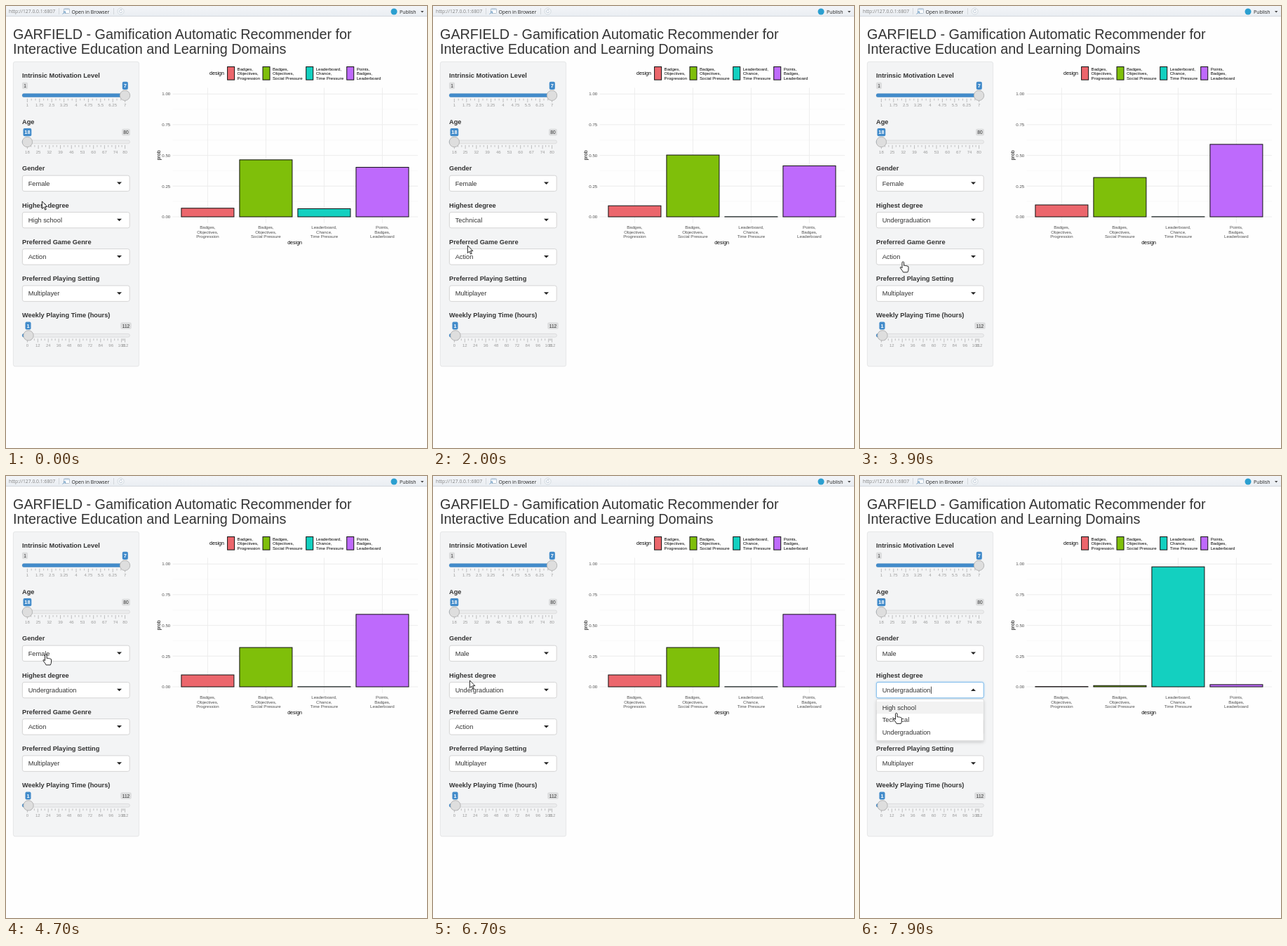
Recreate the animation shown at these times as an HTML page. Size 600 by 629 pixels, loop 8000 ms.

```html
<!DOCTYPE html>
<html lang="en">
<head>
<meta charset="utf-8">
<title>Recommender dashboard</title>
<style>
  html, body { margin: 0; width: 100%; height: 100%; overflow: hidden; background: #fefefe; }
  svg { display: block; width: 100%; height: 100%; }
  text { font-family: "Liberation Sans", Arial, sans-serif; white-space: pre; }
  .bar { font-family: "Open Sans", "Noto Sans", sans-serif; }
</style>
</head>
<body>
<svg id="stage" viewBox="0 0 600 629">
  <defs>
    <linearGradient id="chrome" x1="0" y1="0" x2="0" y2="1">
      <stop offset="0" stop-color="#f3f5f8"/><stop offset="1" stop-color="#e9edf2"/>
    </linearGradient>
    <filter id="shadow" x="-10%" y="-10%" width="120%" height="130%">
      <feDropShadow dx="0" dy="2" stdDeviation="2" flood-opacity=".18"/>
    </filter>
    <filter id="glow" x="-10%" y="-40%" width="120%" height="180%">
      <feDropShadow dx="0" dy="0" stdDeviation="1.6" flood-color="#66afe9" flood-opacity=".6"/>
    </filter>
  </defs>
</svg>
<script>
const NS = 'http://www.w3.org/2000/svg';
const stage = document.getElementById('stage');
const LOOP = 8000;

function add(tag, attrs, parent = stage) {
  const node = document.createElementNS(NS, tag);
  set(node, attrs);
  return parent.appendChild(node);
}
function set(node, attrs) {
  for (const key in attrs) node.setAttribute(key, attrs[key]);
}
function rect(x, y, width, height, fill, extra = {}, parent = stage) {
  return add('rect', { x, y, width, height, fill, ...extra }, parent);
}
function line(x1, y1, x2, y2, stroke, width = 1) {
  return add('line', { x1, y1, x2, y2, stroke, 'stroke-width': width });
}
function path(d, extra, parent = stage) {
  return add('path', { d, ...extra }, parent);
}
function text(x, y, content, size, fill = '#333', extra = {}, parent = stage) {
  const node = add('text', { x, y, 'font-size': size, fill, ...extra }, parent);
  node.textContent = content;
  return node;
}
const MIDDLE = { 'text-anchor': 'middle' };
const BOLD = { 'font-weight': 700 };

// Viewer toolbar
rect(0, 0, 600, 15, 'url(#chrome)');
line(0, 14.5, 600, 14.5, '#d3d8dd');
text(4, 10, 'http://127.0.0.1:6807', 6.8, '#808080', { class: 'bar' });
line(75.5, 3, 75.5, 12, '#d4d8dc');
rect(82.5, 3.5, 8, 7, '#fff', { stroke: '#a9b8c6', 'stroke-width': .8, rx: 1 });
line(82.5, 5, 90.5, 5, '#a9c3dc', 1.2);
path('M80.5 11.5l4-3.5m-2.7 0h2.8v2.6', { fill: 'none', stroke: '#6f9fc8', 'stroke-width': 1 });
text(93.5, 10.5, 'Open in Browser', 6.9, '#222', { class: 'bar' });
line(153.5, 3, 153.5, 12, '#d4d8dc');
add('circle', { cx: 163.5, cy: 7.5, r: 4.6, fill: '#f7f9fb', stroke: '#cbd2d9', 'stroke-width': .8 });
path('M165.7 7.5a2.2 2.2 0 1 1-1-1.9m.2-1.3v1.6h-1.6', { fill: 'none', stroke: '#b9c5d1', 'stroke-width': .8 });
add('circle', { cx: 553, cy: 8, r: 4.5, fill: '#2b9fd0' });
text(561, 10.8, 'Publish', 6.9, '#222', { class: 'bar' });
path('M591 7h4.4l-2.2 2.6z', { fill: '#444' });

// Heading and side panel
text(10, 46.8, 'GARFIELD - Gamification Automatic Recommender for', 19.8);
text(10, 68.4, 'Interactive Education and Learning Domains', 19.8);
rect(10.4, 79.4, 179.2, 433.4, '#f3f4f5', { stroke: '#e0e1e2', 'stroke-width': .8, rx: 2.6 });

function badge(center, y, value, active) {
  const w = String(value).length * 3.7 + 4.4;
  rect(center - w / 2, y, w, active ? 11.2 : 9.6, active ? '#428bca' : '#dcddde', { rx: 2 });
  text(center, y + (active ? 8.2 : 7.3), value, active ? 7.3 : 6.6, active ? '#fff' : '#333',
    active ? { ...MIDDLE, ...BOLD } : MIDDLE);
}

function slider(y, label, min, max, step, value, handleX, valueX) {
  text(23, y, label, 9.24, '#333', BOLD);
  if (value !== min && valueX > 60) badge(27, y + 6.8, min);
  if (value !== max) badge(171, y + 72.8 - 66, max);
  badge(valueX, y + 6, value, true);
  rect(23, y + 23, 153.5, 4.8, '#ebeced', { stroke: '#d0d1d2', 'stroke-width': .6, rx: 2.4 });
  rect(23, y + 22.8, Math.max(0, handleX - 23), 5.2, '#428bca', { rx: 2.4 });
  const at = v => 30.4 + (v - min) / (max - min) * 139.2;
  for (let prev = min, v = min; ; prev = v, v = Math.min(max, v + step)) {
    const x = at(v);
    line(x, y + 30, x, y + 35.2, '#a2a3a4', .66);
    for (let k = 1; k < 3 && v > min; k++) {
      const minor = x - (x - at(prev)) * k / 3;
      line(minor, y + 30, minor, y + 32.7, '#a2a3a4', .66);
    }
    text(x, y + 41.6, v, 6, '#999', MIDDLE);
    if (v >= max) break;
  }
  add('circle', { cx: handleX, cy: y + 25.5, r: 7.2, fill: '#dedede', stroke: '#a9a9a9', 'stroke-width': .8 });
}
slider(101.8, 'Intrinsic Motivation Level', 1, 7, .75, 7, 169.5, 169.8);
slider(168, 'Age', 18, 80, 7, 18, 30.4, 30.4);
slider(443.4, 'Weekly Playing Time (hours)', 0, 112, 12, 1, 32, 31.5);

const BOX_HEIGHT = 22.4, OPTION_HEIGHT = 17.35;
function select(index, label, value) {
  const y = 241.2 + index * 52.25;
  text(23, y - 6.9, label, 9.24, '#333', BOLD);
  const box = rect(23.4, y, 152.8, BOX_HEIGHT, '#fff', { stroke: '#ccc', 'stroke-width': .8, rx: 2.6 });
  const caption = text(31.7, y + 14.3, value, 9.24);
  const arrow = path('', { fill: '#222' });
  const caret = rect(0, y + 6.2, .8, 10.2, '#222');
  return {
    y,
    show(value, open) {
      caption.textContent = value;
      set(box, open ? { stroke: '#66afe9', filter: 'url(#glow)' } : { stroke: '#ccc', filter: 'none' });
      const base = y + (open ? 12.6 : 9.2), tip = open ? -3.5 : 3.5;
      arrow.setAttribute('d', `M158 ${base}h7l-3.5 ${tip}z`);
      caret.setAttribute('x', 32.2 + caption.getComputedTextLength());
      caret.setAttribute('visibility', open ? 'visible' : 'hidden');
    }
  };
}
const gender = select(0, 'Gender', 'Female');
const degree = select(1, 'Highest degree', 'High school');
const genre = select(2, 'Preferred Game Genre', 'Action');
const setting = select(3, 'Preferred Playing Setting', 'Multiplayer');
genre.show('Action', false);
setting.show('Multiplayer', false);

function menu(owner, options) {
  const group = add('g', {});
  const top = owner.y + 27.6;
  rect(23.4, top - 3.2, 152.8, options.length * OPTION_HEIGHT + 6.8, '#fff',
    { stroke: '#d0d0d0', 'stroke-width': .7, rx: 1.5, filter: 'url(#shadow)' }, group);
  const hover = rect(23.8, top, 152, OPTION_HEIGHT, '#f2f2f2', {}, group);
  options.forEach((name, i) =>
    text(31.7, top + i * OPTION_HEIGHT + 12, name, 9.24, '#333', {}, group));
  return (open, pointerY, value) => {
    group.setAttribute('visibility', open ? 'visible' : 'hidden');
    const under = Math.floor((pointerY - top) / OPTION_HEIGHT);
    const active = options[under] ? under : options.indexOf(value);
    hover.setAttribute('y', top + active * OPTION_HEIGHT);
  };
}

// Chart
const ZERO = 300, UNIT = 174.8;
const COLORS = ['#eb666c', '#7fbf0a', '#13d0c0', '#be6afc'];
const DESIGNS = [
  ['Badges,', 'Objectives,', 'Progression'],
  ['Badges,', 'Objectives,', 'Social Pressure'],
  ['Leaderboard,', 'Chance,', 'Time Pressure'],
  ['Points,', 'Badges,', 'Leaderboard']
];
const center = i => 287.4 + i * 83;
for (let i = 0; i <= 8; i++) {
  const y = ZERO - UNIT * i / 8, major = i % 2 === 0;
  line(237.5, y, 587, y, major ? '#ebebeb' : '#f3f3f3', major ? .9 : .5);
  if (major) text(234.2, y + 2.2, (i / 8).toFixed(2), 6.1, '#4d4d4d', { 'text-anchor': 'end' });
}
text(290, 98.4, 'design', 7.1, '#000');
text(411.6, 338.8, 'design', 7.1, '#000', MIDDLE);
text(0, 0, 'prob', 7.1, '#000', { ...MIDDLE, transform: 'translate(219.6 212.5) rotate(-90)' });
const bars = DESIGNS.map((words, i) => {
  const x = center(i), keyX = [315.6, 366, 427.7, 485.7][i];
  line(x, 116.5, x, 308.8, '#ebebeb', .9);
  rect(keyX, 86.5, 10, 18.6, COLORS[i], { stroke: '#111', 'stroke-width': 1 });
  words.forEach((word, row) => {
    text(x, 317.2 + row * 6.4, word, 6.1, '#4d4d4d', MIDDLE);
    text(keyX + 14, 92 + row * 6.4, word, 6.1, '#000');
  });
  return rect(x - 37.5, ZERO, 75, 0, COLORS[i], { stroke: '#111', 'stroke-width': 1 });
});

const showGenderMenu = menu(gender, ['Female', 'Male']);
const showDegreeMenu = menu(degree, ['High school', 'Technical', 'Undergraduation']);

// Pointers, both with the tip at the origin
const INK = { fill: '#fff', stroke: '#111', 'stroke-width': .9, 'stroke-linejoin': 'round' };
const arrowPointer = path('M.4 .4V11l2.5-2.3 1.7 3.9 1.7-.7-1.7-3.8h3.3z', INK);
const handPointer = path('M0 1.2q1.4-1.8 2.6 0V6q1-.8 2.2.2 1.2-.7 2.1.4 1.5-.5 2.1.9v4q0 1.6-1.2 3.9H1.6' +
  'Q.7 13.2-2.5 9.4q-.4-1.7 1-1.3L0 9.4z', INK);

// Each list holds [start time, state]
const PROBS = [
  [0, [.07, .464, .066, .403]],
  [600, [.09, .503, .001, .415]],
  [2200, [.212, .182, .001, .616]],
  [3700, [.097, .32, .001, .59]],
  [7000, [.002, .01, .977, .018]]
];
const GENDER = [[0, 'Female'], [6500, 'Male']];
const DEGREE = [[0, 'High school'], [1700, 'Technical'], [3200, 'Undergraduation']];
const OPEN = [[0, null], [1000, degree], [1700, null], [2400, degree], [3200, null],
  [5000, gender], [6500, null], [7300, degree]];
const POINTER = [
  [0, 51, 277.5], [400, 51, 277.5], [900, 50, 303], [1050, 50, 303], [1400, 47.5, 340.5],
  [1650, 47.5, 347], [1900, 48, 347], [2300, 54, 306], [2450, 54, 306], [2900, 62, 355],
  [3150, 62, 364], [3900, 60, 363.5], [4100, 60, 363.5], [4700, 55.5, 253.5], [5050, 55.5, 253.5],
  [5800, 52, 291], [6750, 52, 290.5], [7150, 52, 304], [7350, 52, 304], [7900, 50.5, 337]
];

const current = (list, t) => list.filter(entry => entry[0] <= t).pop()[1];

function pointerAt(t) {
  const next = POINTER.findIndex(p => p[0] > t);
  if (next < 0) return POINTER[POINTER.length - 1].slice(1);
  const [t0, x0, y0] = POINTER[next - 1], [t1, x1, y1] = POINTER[next];
  const u = (t - t0) / (t1 - t0), k = u * u * (3 - 2 * u);
  return [x0 + (x1 - x0) * k, y0 + (y1 - y0) * k];
}

function render(t) {
  const [x, y] = pointerAt(t);
  const open = current(OPEN, t), sex = current(GENDER, t), level = current(DEGREE, t);
  gender.show(sex, open === gender);
  degree.show(level, open === degree);
  showGenderMenu(open === gender, y, sex);
  showDegreeMenu(open === degree, y, level);

  current(PROBS, t).forEach((p, i) =>
    set(bars[i], { y: ZERO - p * UNIT, height: p * UNIT }));

  const overBox = [gender, degree, genre, setting].some(s => y >= s.y && y <= s.y + BOX_HEIGHT);
  const hand = Boolean(open) || overBox;
  const pointer = hand ? handPointer : arrowPointer;
  pointer.setAttribute('transform', `translate(${x} ${y})`);
  handPointer.setAttribute('visibility', hand ? 'visible' : 'hidden');
  arrowPointer.setAttribute('visibility', hand ? 'hidden' : 'visible');
}

const start = performance.now();
function tick() {
  render((performance.now() - start) % LOOP);
  requestAnimationFrame(tick);
}
tick();
</script>
</body>
</html>
```
